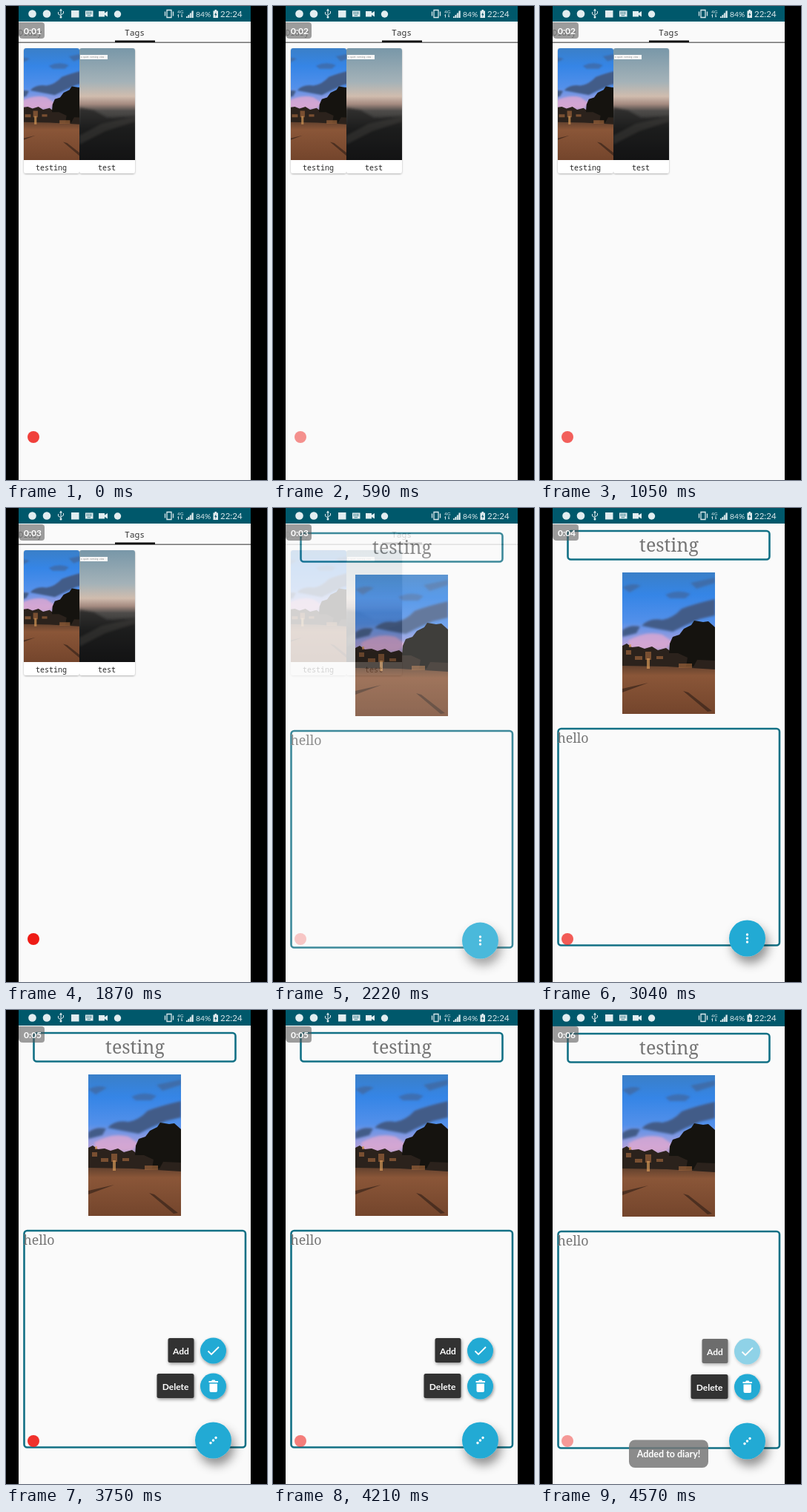
These frames come from a looping animation (352x640 px, 4690 ms). An HTML page:

```html
<!DOCTYPE html>
<html lang="en">
<head>
<meta charset="utf-8">
<title>Diary tags</title>
<style>
  html, body { margin: 0; width: 100%; height: 100%; overflow: hidden; background: #000; }
  svg { display: block; width: 100%; height: 100%; }
  text { font: 500 10px "Noto Sans Mono", monospace; }
  .mid { text-anchor: middle; }
  .bar, .clock { font: 11.5px Lato, sans-serif; fill: #dce8ec; }
  .clock { font-weight: 700; font-size: 12px; fill: #fff; }
  .serif { font: 500 25px "Noto Serif", serif; fill: #757575; }
  .label { font: 700 12px Lato, sans-serif; fill: #fff; }
  .frame { fill: none; stroke: #127085; stroke-width: 2.6; }
  .line { fill: none; stroke: #dce8ec; }
  .fab { fill: #22aad4; }
</style>
</head>
<body>
<svg viewBox="0 0 352 640">
  <defs>
    <linearGradient id="sky" x2="0" y2="1">
      <stop offset="0" stop-color="#3a7fc8"/>
      <stop offset=".25" stop-color="#3585e6"/>
      <stop offset=".55" stop-color="#5390ea"/>
      <stop offset=".78" stop-color="#a89fdc"/>
      <stop offset="1" stop-color="#c09aa8"/>
    </linearGradient>
    <linearGradient id="ground" x2="0" y2="1">
      <stop offset="0" stop-color="#4a3528"/>
      <stop offset=".3" stop-color="#8a5638"/>
      <stop offset="1" stop-color="#74452c"/>
    </linearGradient>
    <linearGradient id="dusk" x2="0" y2="1">
      <stop offset="0" stop-color="#7897a8"/>
      <stop offset=".3" stop-color="#a4b2b8"/>
      <stop offset=".43" stop-color="#d0bcae"/>
      <stop offset=".5" stop-color="#a48a80"/>
      <stop offset=".56" stop-color="#4e4c4a"/>
      <stop offset=".72" stop-color="#252626"/>
      <stop offset="1" stop-color="#101012"/>
    </linearGradient>
    <filter id="soft"><feGaussianBlur stdDeviation="1.6"/></filter>
    <filter id="lift" x="-50%" y="-50%" width="200%" height="200%">
      <feDropShadow dx="1" dy="2" stdDeviation="2" flood-opacity=".4"/>
    </filter>
    <filter id="float" x="-60%" y="-60%" width="220%" height="220%">
      <feDropShadow dx="4" dy="9" stdDeviation="7" flood-opacity=".42"/>
    </filter>
    <filter id="edge"><feDropShadow dx="0" dy="1" stdDeviation=".8" flood-opacity=".3"/></filter>
    <clipPath id="screen"><path d="M17 0H330V640H17z"/></clipPath>
    <clipPath id="cards"><path d="M24 208V60q0-3 3-3H96q3 0 3 3 0-3 3-3H171q3 0 3 3V208z"/></clipPath>

    <symbol id="park" viewBox="0 0 125 191" preserveAspectRatio="xMidYMid slice">
      <path fill="url(#sky)" d="M0 0H125V122H0z"/>
      <g filter="url(#soft)">
        <path fill="#e0a8d0" d="M8 92q24-14 46-8l14 10-10 9H10z" opacity=".75"/>
        <g fill="#435c88">
          <path d="M26 72q10-11 28-8 14-2 26-15 18-7 45-13V58L104 63 84 72 68 80 46 76z"/>
          <path d="M0 78q10-8 24-5l-5 9L0 87z"/>
          <path d="M58 30q18-8 34-1l-7 6H64zM0 20q14-7 25-2L10 27zM92 14l33-7v7l-25 8z" opacity=".55"/>
        </g>
      </g>
      <path fill="url(#ground)" d="M0 117H125V191H0z"/>
      <path fill="#2b221c" d="M0 99l6-3 7 5 9-1 8 3 10-3 8 5 11-3 8 6 58-6V131L60 127 0 126z"/>
      <path fill="#15130f" d="M63 109l1-13 4-9 9-3 6-8 10-5 4-6 12 2 7-1 9 8V119l-24-1-5 9H86l2-12-13-6z"/>
      <path fill="#a4683c" d="M5 105h7v6H5zM17 113h10v5H17zM31 107h8v11h-8zM46 113h9v4h-9zM76 123h18v6H76z" opacity=".65"/>
      <path fill="#d89a58" d="M33 116h4v14h-4zM9 97h3v4H9z" opacity=".7"/>
      <path fill="#38241a" d="M82 160l7 2 32 25-6 1zM0 157l35-8-35 13z" opacity=".7"/>
    </symbol>
    <symbol id="hill" viewBox="0 0 75 151">
      <path fill="url(#dusk)" d="M0 0H75V151H0z"/>
      <path fill="#161618" filter="url(#soft)" d="M0 80l20 4 18 10 37-2V160H0z" opacity=".55"/>
      <path fill="#4e4b46" filter="url(#soft)" d="M0 118l30-16 45-10v7L35 112 0 130z" opacity=".35"/>
      <path fill="#f6f6f6" d="M1 9H38v6H1z"/>
      <text x="2" y="13" style="font-size:2.6px" fill="#888">a quiet evening view</text>
    </symbol>
  </defs>

  <rect width="352" height="640"/>
  <g clip-path="url(#screen)">
    <path fill="#fafafa" d="M17 0H330V640H17z"/>

    <g id="list">
      <text x="17" y="40" style="font-size:10.5px" fill="#8a8a8a">Diary</text>
      <text class="mid" x="173.500" y="40" style="font-size:11.3px" fill="#333">Tags</text>
      <path fill="#727272" d="M17 48.500H330V50H17z"/>
      <path fill="#111" d="M147 46.500H201V49H147z"/>
      <g fill="#fff" filter="url(#edge)">
        <rect x="24" y="57" width="75" height="169" rx="3.500"/>
        <rect x="99" y="57" width="75" height="169" rx="3.500"/>
      </g>
      <g clip-path="url(#cards)">
        <use href="#park" x="24" y="57" width="75" height="151"/>
        <use href="#hill" x="99" y="57" width="75" height="151"/>
      </g>
      <g class="mid" fill="#2a2a2a">
        <text x="61" y="221.500">testing</text>
        <text x="136" y="221.500">test</text>
      </g>
    </g>

    <g id="detail">
      <path fill="#fafafa" d="M17 0H330V660H17z"/>
      <rect class="frame" x="37.500" y="31" width="272" height="38.500" rx="4"/>
      <text class="serif mid" x="174" y="58.500">testing</text>
      <use href="#park" x="111" y="87" width="125" height="191"/>
      <rect class="frame" x="24.500" y="298" width="298.500" height="292.500" rx="4"/>
      <text class="serif" x="23.500" y="317" style="font-size:17.800px">hello</text>
      <g id="add">
        <g filter="url(#lift)"><rect x="218.500" y="443" width="35" height="33" rx="2.500" fill="#333"/></g>
        <text class="label mid" x="236" y="464.500">Add</text>
        <g class="pop">
          <circle class="fab" cx="279.500" cy="460" r="17.500" filter="url(#lift)"/>
          <path d="M272.500 460.500l4.500 4.500 10-10" fill="none" stroke="#fff" stroke-width="1.800"/>
        </g>
      </g>
      <g id="remove">
        <g filter="url(#lift)"><rect x="203.500" y="491" width="50" height="33" rx="2.500" fill="#333"/></g>
        <text class="label mid" x="228.500" y="512.500">Delete</text>
        <g class="pop">
          <circle class="fab" cx="279.500" cy="508" r="17.500" filter="url(#lift)"/>
          <path fill="#fff" d="M273.500 501h3.500l1-1.500h3.500l1 1.500H286v2H273.500zM274.500 504.500H285V514q0 2-2 2h-6.500q-2 0-2-2z"/>
        </g>
      </g>
      <circle class="fab" cx="279.500" cy="581" r="24.500" filter="url(#float)"/>
      <g id="dots" fill="#fff">
        <circle cx="279.500" cy="576" r="1.700"/>
        <circle cx="279.500" cy="581" r="1.700"/>
        <circle cx="279.500" cy="586" r="1.700"/>
      </g>
    </g>

    <rect id="bar" x="17" width="313" height="21" fill="#00586b"/>
    <g fill="#e2edf0">
      <circle cx="35.500" cy="10.500" r="5.300"/>
      <circle cx="55" cy="10.500" r="5.300"/>
      <g class="line">
        <path d="M74 5v11M70.500 8v3l3.500 2M77.500 7v3L74 12"/>
        <path d="M217 5.500h6v10h-6zM214.500 7.500v6M225.500 7.500v6" stroke-width="1.300"/>
      </g>
      <circle cx="74" cy="15" r="1.500"/><path d="M72 6.500l2-3 2 3z"/>
      <rect x="88" y="6" width="10.500" height="9.500"/>
      <path d="M107 6.500h10.500v8H107z"/>
      <path d="M108.500 8.500h7.500M108.500 10.500h7.500M110 12.700h4.500" stroke="#00586b" stroke-dasharray="1.500 .8"/>
      <path d="M125 7h8v2.500l4-2.500v7.500l-4-2.500v2.500h-8z"/>
      <circle cx="150.500" cy="11" r="4.700"/>
      <path d="M243 16l10-10v10z" opacity=".45"/>
      <path d="M243 16h1.500v-2H243zM245.500 16H247v-4h-1.500zM248 16h1.500v-6.500H248zM250.500 16h2V6.500h-2z"/>
      <path d="M279.500 6.500h2V5h2.500v1.500h2V16h-6.500z"/>
      <path d="M283.300 8l-2 4h1.300l-.5 3 2.400-4.300H283z" fill="#00586b"/>
    </g>
    <text class="bar" x="231" y="9.500" style="font-size:6.500px">4G</text>
    <path class="line" d="M232.500 15.500v-4l-1 1M237 11v4l1-1"/>
    <text class="bar" x="256" y="15" style="font-size:10.300px">84%</text>
    <text class="bar" x="289" y="15">22:24</text>

    <g id="toast">
      <rect x="120" y="580.500" width="107" height="37.500" rx="8" fill="#777"/>
      <text class="label mid" x="173.500" y="604" style="font-size:12.500px">Added to diary!</text>
    </g>
    <path fill="#555" opacity=".56" d="M17 22H48q4 0 4 4V40q0 4-4 4H23q-6 0-6-6z"/>
    <text id="timer" class="clock mid" x="36" y="37.500"></text>
    <circle id="rec" cx="37" cy="582" r="8" fill="#ee1a14"/>
  </g>
</svg>
<script>
  const LOOP = 4690, STEPS = 40, STEP = LOOP / STEPS;
  const el = id => document.getElementById(id);
  const ramp = (t, from, to) => Math.min(1, Math.max(0, (t - from) / (to - from)));
  const ease = x => 1 - (1 - x) ** 3;
  const fade = (id, a) => el(id).setAttribute('opacity', a);
  const move = (node, value) => node.setAttribute('transform', value);

  function item(id, y, shown, alpha) {
    fade(id, shown * alpha);
    move(el(id).querySelector('.pop'),
      `translate(279.5 ${y}) scale(${shown}) translate(-279.5 ${-y})`);
  }

  function draw(t) {
    const enter = ease(ramp(t, 2100, 2400));
    const press = ramp(t, 4460, 4570);
    fade('detail', enter);
    move(el('detail'), `translate(0 ${16 * (1 - enter) + press})`);
    el('bar').setAttribute('height', 21 + press);

    item('remove', 508, ease(ramp(t, 3250, 3450)), 1);
    item('add', 460, ease(ramp(t, 3300, 3500)), 1 - .3 * press);
    el('add').querySelector('.pop').setAttribute('opacity', 1 - .3 * press);
    move(el('dots'), `rotate(${-135 * ease(ramp(t, 3200, 3500))} 279.5 581)`);
    fade('toast', .84 * press);

    el('timer').textContent = '0:0' + (1 + Math.floor((t + 480) / 1000));
    fade('rec', .54 + .46 * Math.cos(2 * Math.PI * (t / 1000 - .86)));
  }

  function tick() {
    const step = Math.floor((performance.now() % LOOP + 8) / STEP);
    draw(Math.min(step, STEPS - 1) * STEP);
    requestAnimationFrame(tick);
  }
  tick();
</script>
</body>
</html>
```
